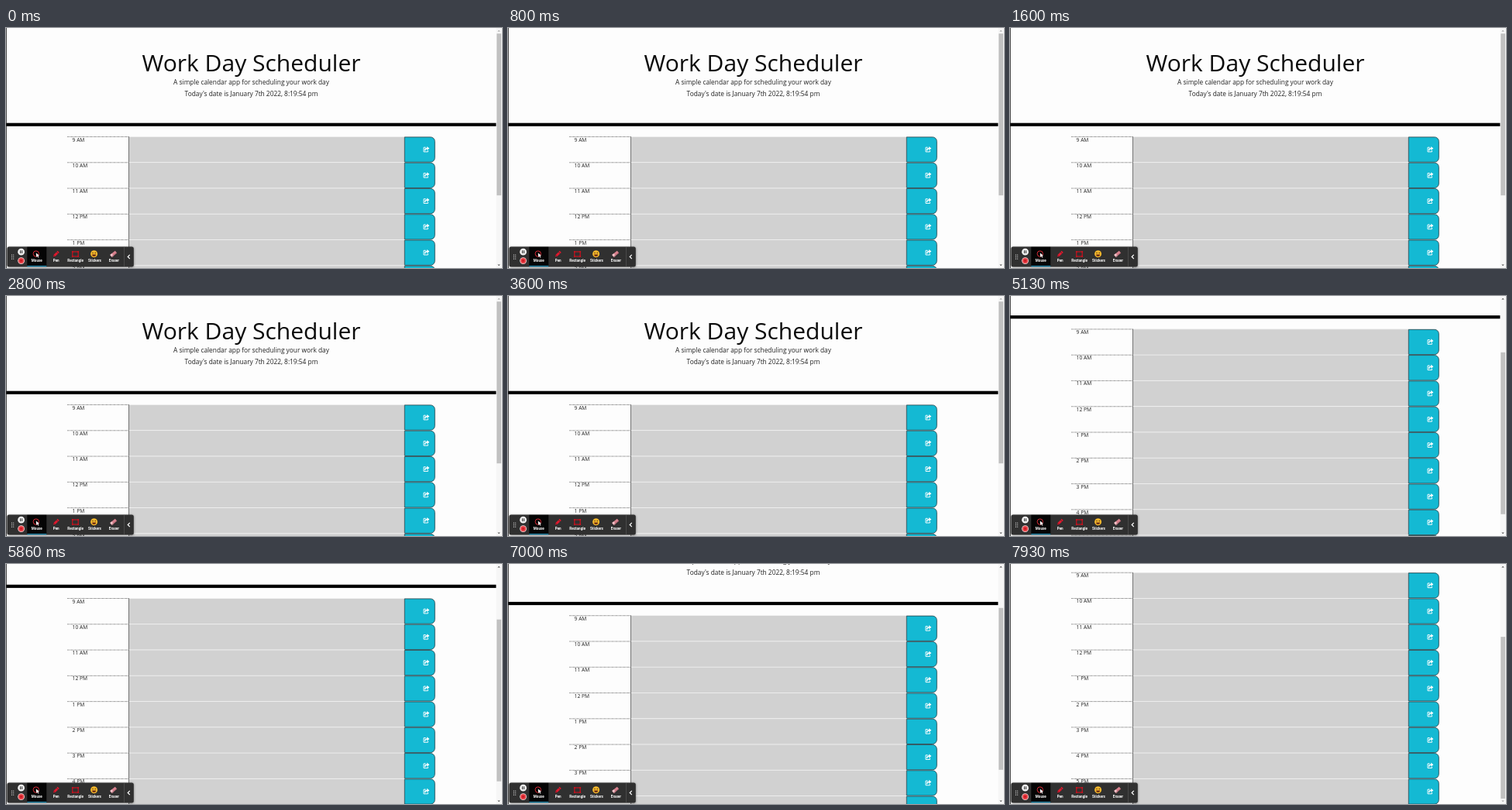
An HTML page with a canvas for the animation above (8 s loop, 640x310 px).

```html
<!DOCTYPE html>
<html lang="en">
<head>
<meta charset="utf-8">
<title>Work Day Scheduler</title>
<style>
  html, body { margin: 0; width: 100%; height: 100%; overflow: hidden; background: #fdfdfd; }
  canvas { display: block; width: 640px; height: 310px; }
</style>
</head>
<body>
<canvas id="stage"></canvas>
<script>
const W = 640, H = 310, LOOP = 8000, STEPS = 120;
const ROW_TOP = 140.3, ROW_H = 33.28, MAX_SCROLL = 129.3;
const HOURS = ['9 AM', '10 AM', '11 AM', '12 PM', '1 PM', '2 PM', '3 PM', '4 PM', '5 PM'];

// [step, scroll offset]
const SCROLL = [
  [0, 0], [55, 0], [56, 30], [57, 96], [58, MAX_SCROLL],
  [76, MAX_SCROLL], [77, 97.6], [78, 46], [79, 10], [80, 0],
  [85, 0], [86, 30], [87, 96], [88, MAX_SCROLL],
  [104, MAX_SCROLL], [105, 73.8], [106, 22], [107, 0],
  [112, 0], [113, 30], [114, 96], [115, MAX_SCROLL], [120, MAX_SCROLL]
];

const canvas = document.getElementById('stage');
const ctx = canvas.getContext('2d');
const dpr = window.devicePixelRatio || 1;
canvas.width = W * dpr;
canvas.height = H * dpr;

function scrollAt(step) {
  const i = SCROLL.findIndex(k => k[0] >= step);
  if (i <= 0) return SCROLL[0][1];
  const [s0, y0] = SCROLL[i - 1], [s1, y1] = SCROLL[i];
  return y0 + (y1 - y0) * (step - s0) / (s1 - s0);
}

function rect(x, y, w, h, color) {
  ctx.fillStyle = color;
  ctx.fillRect(x, y, w, h);
}

function disc(x, y, r, color) {
  ctx.fillStyle = color;
  ctx.beginPath();
  ctx.arc(x, y, r, 0, Math.PI * 2);
  ctx.fill();
}

function line(points, color, width) {
  ctx.strokeStyle = color;
  ctx.lineWidth = width;
  ctx.beginPath();
  points.forEach(([x, y], i) => i ? ctx.lineTo(x, y) : ctx.moveTo(x, y));
  ctx.stroke();
}

function poly(points, color) {
  ctx.fillStyle = color;
  ctx.beginPath();
  points.forEach(([x, y]) => ctx.lineTo(x, y));
  ctx.fill();
}

function text(str, x, y, font, color, align) {
  ctx.font = font;
  ctx.fillStyle = color;
  ctx.textAlign = align;
  ctx.fillText(str, x, y);
}

function tilted(x, y, angle, draw) {
  ctx.save();
  ctx.translate(x, y);
  ctx.rotate(angle);
  draw();
  ctx.restore();
}

function drawHeader() {
  const font = size => size + 'px "Open Sans", sans-serif';
  text('Work Day Scheduler', 316.5, 56, font(30), '#0a0a0a', 'center');
  text('A simple calendar app for scheduling your work day', 316.5, 73.2, font(8.333), '#222', 'center');
  text("Today's date is January 7th 2022, 8:19:54 pm", 316.5, 88.2, font(8.333), '#222', 'center');
  rect(0, 122.7, 632.6, 4.2, '#000');
}

function drawShareIcon(x, y) {
  ctx.lineJoin = 'round';
  line([[x - 0.3, y - 2.5], [x - 3, y - 2.5], [x - 3, y + 3.2], [x + 2.4, y + 3.2], [x + 2.4, y + 1.4]], '#fff', 0.95);
  ctx.strokeStyle = '#fff';
  ctx.lineWidth = 1.5;
  ctx.beginPath();
  ctx.moveTo(x - 1.2, y + 1.6);
  ctx.quadraticCurveTo(x - 1.6, y - 1.3, x + 1.6, y - 1.2);
  ctx.stroke();
  poly([[x + 1.2, y - 3.8], [x + 4.3, y - 1.2], [x + 1.2, y + 1.4]], '#fff');
}

function drawRow(label, y) {
  rect(158.5, y, 356, ROW_H, '#d1d1d1');
  rect(158.5, y - 0.3, 356, 0.8, '#f3f3f3');

  ctx.setLineDash([0.85, 0.4]);
  line([[79, y + 0.2], [158.5, y + 0.2]], '#555', 0.7);
  ctx.setLineDash([]);
  text(label, 85.6, y + 6.2, '6.667px "Open Sans", sans-serif', '#222', 'left');
  rect(158.2, y, 0.8, ROW_H, '#555');

  ctx.beginPath();
  ctx.roundRect(514.3, y + 0.6, 39, ROW_H - 1, [0, 5.5, 5.5, 0]);
  ctx.fillStyle = '#14b9d3';
  ctx.fill();
  ctx.strokeStyle = '#26454c';
  ctx.lineWidth = 0.85;
  ctx.stroke();
  drawShareIcon(542, y + 16.4);
}

function drawScrollbar(scroll) {
  rect(632.6, 0, 7.4, H, '#f6f6f6');
  rect(633.2, 7.2 + scroll * 0.672, 5.8, 209, '#c1c1c1');
  const up = scroll > 0 ? '#505050' : '#a3a3a3';
  const down = scroll < MAX_SCROLL ? '#505050' : '#a3a3a3';
  poly([[634.3, 4.6], [637.7, 4.6], [636, 2.8]], up);
  poly([[634.3, 305.4], [637.7, 305.4], [636, 307.2]], down);
}

function drawTools() {
  // pointer
  ctx.strokeStyle = '#d92a35';
  ctx.lineWidth = 1;
  ctx.beginPath();
  ctx.arc(38.8, 291.6, 3.7, 0, Math.PI * 2);
  ctx.stroke();
  poly([[38.8, 290.6], [39.2, 296], [40.5, 294.7], [41.6, 296.8], [42.4, 296.3], [41.4, 294.3], [43, 294]], '#fff');

  // pen
  tilted(64.5, 292, -Math.PI / 4, () => {
    rect(-2.8, -1.5, 5, 3, '#e0182d');
    rect(2.7, -1.5, 1.8, 3, '#e0182d');
    poly([[-3, -1.5], [-5, 0], [-3, 1.5]], '#b51224');
  });

  // rectangle
  ctx.strokeStyle = '#c9121f';
  ctx.lineWidth = 1.2;
  ctx.strokeRect(85.8, 289, 7.4, 6);
  [[85.8, 289], [93.2, 289], [85.8, 295], [93.2, 295]].forEach(([x, y]) => rect(x - 0.9, y - 0.9, 1.8, 1.8, '#c9121f'));

  // smiley
  disc(113.6, 291.8, 4.5, '#f6b92c');
  disc(112, 290.6, 0.75, '#4c3210');
  disc(115.2, 290.6, 0.75, '#4c3210');
  ctx.fillStyle = '#6b2b14';
  ctx.beginPath();
  ctx.arc(113.6, 292.6, 2.5, 0, Math.PI);
  ctx.fill();

  // eraser
  tilted(138.7, 291.8, -Math.PI / 4.6, () => {
    rect(-4.2, -1.9, 8.4, 3.8, '#d9828f');
    rect(-4.2, -1.9, 2.8, 3.8, '#f1c6cb');
    rect(-4.2, 1, 8.4, 0.9, '#a9606c');
  });
}

function drawToolbar() {
  ctx.save();
  ctx.shadowColor = 'rgba(0,0,0,0.45)';
  ctx.shadowBlur = 3 * dpr;
  ctx.shadowOffsetY = 0.5 * dpr;
  ctx.fillStyle = '#303030';
  ctx.beginPath();
  ctx.roundRect(1.5, 282.5, 163.3, 26, 2.5);
  ctx.fill();
  ctx.restore();

  for (let i = 0; i < 6; i++) disc(7.5 + (i % 2) * 2.2, 293.2 + (i >> 1) * 2.5, 0.6, '#ddd');

  disc(19.6, 289.2, 4.4, '#f2f2f2');
  rect(18, 287.3, 1.1, 3.8, '#333');
  rect(20.1, 287.3, 1.1, 3.8, '#333');
  disc(19.6, 300.6, 4.4, '#f4dada');
  disc(19.6, 300.6, 3.6, '#e8474c');
  rect(18, 299, 3.2, 3.2, '#d11c26');

  rect(27.3, 282.8, 25, 25.3, '#050505');
  rect(27.3, 307, 25, 1.2, '#1c8fb8');
  drawTools();
  ['Mouse', 'Pen', 'Rectangle', 'Stickers', 'Eraser'].forEach((name, i) =>
    text(name, 39.8 + i * 24.9, 302, 'bold 4.6px Roboto, sans-serif', '#fff', 'center'));

  rect(152.2, 283, 0.7, 25, '#555');
  line([[159.8, 292.9], [157.2, 295.5], [159.8, 298.1]], '#fff', 1.2);
}

function draw(now) {
  const step = Math.floor(((now % LOOP) + 5) / (LOOP / STEPS)) % STEPS;
  const scroll = scrollAt(step);
  ctx.setTransform(dpr, 0, 0, dpr, 0, 0);
  rect(0, 0, W, H, '#fdfdfd');

  ctx.save();
  ctx.translate(0, -scroll);
  drawHeader();
  HOURS.forEach((label, i) => drawRow(label, ROW_TOP + i * ROW_H));
  ctx.restore();

  rect(0, 0, 0.8, H, '#222');
  drawScrollbar(scroll);
  drawToolbar();
}

let start;
function tick(now) {
  if (start === undefined) start = now;
  draw(Math.max(0, now - start));
  requestAnimationFrame(tick);
}
draw(0);
requestAnimationFrame(tick);
</script>
</body>
</html>
```
